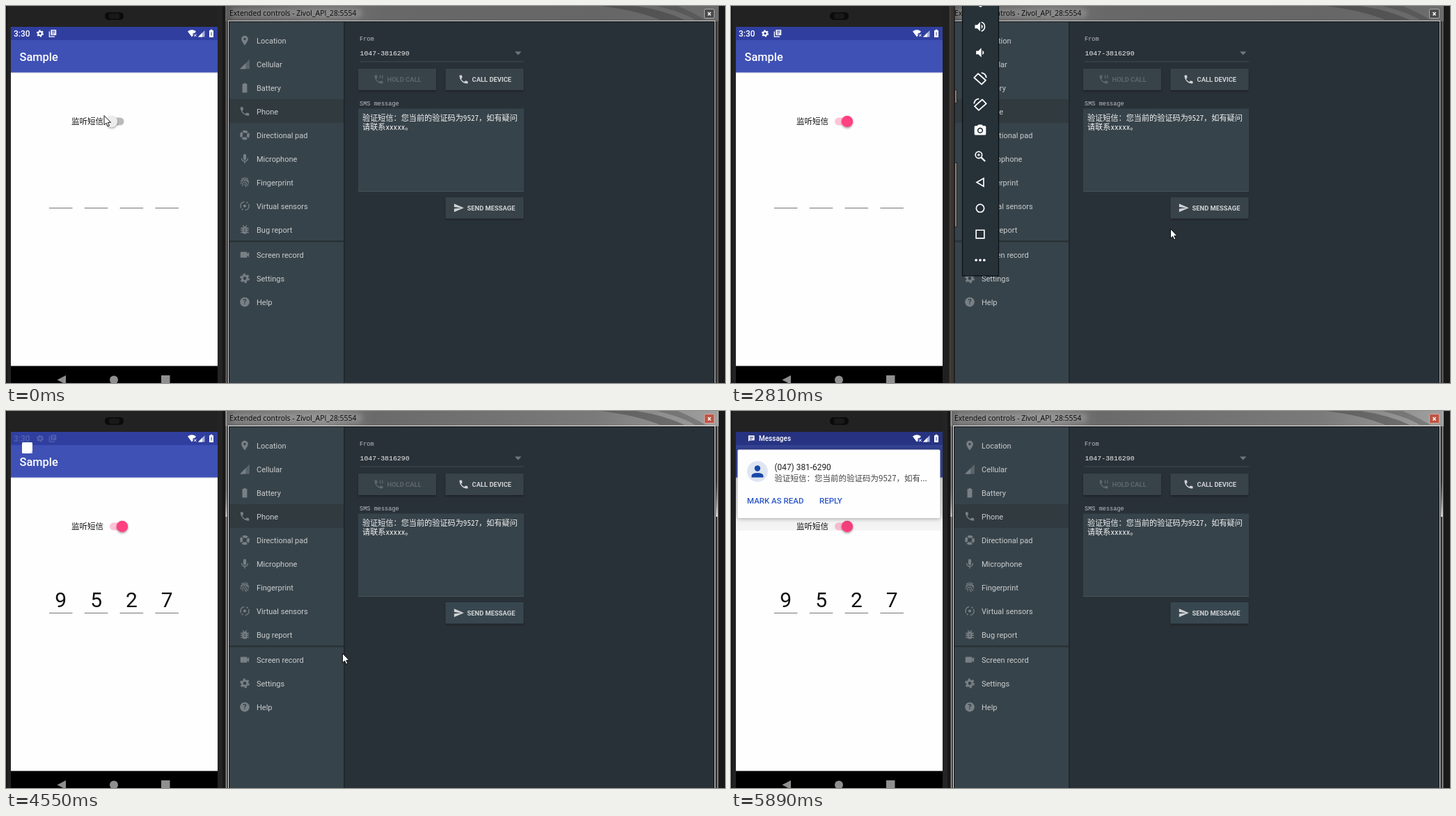
Recreate the animation shown at these times as an HTML page. Size 1033 by 542 pixels, loop 6.29 s.

```html
<!DOCTYPE html>
<html lang="en">
<head>
<meta charset="utf-8">
<title>SMS code autofill</title>
<style>
html, body { margin: 0; width: 100%; height: 100%; overflow: hidden; background: #1b1b1b; }
svg { display: block; width: 100%; height: 100%; }
text { font-family: Roboto, "Noto Sans CJK SC", sans-serif; white-space: pre; }
.cjk { font-family: "Noto Sans CJK SC", "Noto Sans CJK", sans-serif; }
.cjkMono { font-family: "Noto Sans Mono CJK SC", "Noto Sans CJK SC", monospace; }
.mono { font-family: "Liberation Mono", monospace; }
.open { font-family: "Open Sans", "Noto Sans", sans-serif; }
</style>
</head>
<body>
<svg id="stage" viewBox="0 0 1033 542" preserveAspectRatio="none"></svg>
<script>
const LOOP = 6290;

// Markup helpers
const rect = (x, y, w, h, fill, more = '') =>
  `<rect x="${x}" y="${y}" width="${w}" height="${h}" fill="${fill}" ${more}/>`;
const circle = (x, y, r, fill, more = '') =>
  `<circle cx="${x}" cy="${y}" r="${r}" fill="${fill}" ${more}/>`;
const text = (x, y, size, fill, str, more = '') =>
  `<text x="${x}" y="${y}" font-size="${size}" fill="${fill}" ${more}>${str}</text>`;
const path = (d, more = '') => `<path d="${d}" ${more}/>`;
const line = (d, width = 2, more = '') =>
  path(d, `fill="none" stroke="currentColor" stroke-width="${width}" ${more}`);
const group = (id, body, more = '') => `<g id="${id}" ${more}>${body}</g>`;
const gradient = (id, dir, stops) =>
  `<linearGradient id="${id}" ${dir}>` + stops.map(([at, color, alpha = 1]) =>
    `<stop offset="${at}" stop-color="${color}" stop-opacity="${alpha}"/>`).join('') + '</linearGradient>';

// Icons on a 24-unit grid
const ring = (r, w, more = '') => circle(12, 12, r, 'none', `stroke="currentColor" stroke-width="${w}" ${more}`);
const speaker = path('M3 9v6h4l5 5V4L7 9z');
const gear = ring(5.5, 4) + ring(8.6, 3, 'stroke-dasharray="4.5 4.5"');
const handset = path('M6.6 10.8c1.4 2.8 3.8 5.1 6.6 6.6l2.2-2.2c.3-.3.7-.4 1-.2 1.1.4 2.3.6 3.6.6.6 0 1 .4 1 1V20c0 .6-.4 1-1 1C10.6 21 3 13.4 3 4c0-.6.4-1 1-1h3.5c.6 0 1 .4 1 1 0 1.2.2 2.4.6 3.6.1.3 0 .7-.2 1z');
const tilt = line('M1.5 10.5l7-7 13 11.5-7 7z', 2.2, 'stroke-linejoin="round"') + line('M14 2.2q7.5.8 8.6 8.3', 2.2);
const icons = {
  pin: path('M12 2C8 2 5 5 5 9c0 5 7 13 7 13s7-8 7-13c0-4-3-7-7-7zm0 9.5a2.5 2.5 0 0 1 0-5 2.5 2.5 0 0 1 0 5z'),
  cell: path('M2 22H22V2z', 'opacity=".55"') + path('M2 22H14V10z'),
  battery: path('M14 4V2h-4v2H7v18h10V4z'),
  handset,
  hold: handset + line('M15 3v7M20 3v7'),
  pad: ring(7.3, 5.4, 'stroke-dasharray="9.5 1.97" stroke-dashoffset="4.7"'),
  mic: rect(9, 2, 6, 13, 'currentColor', 'rx="3"') + line('M5.5 11a6.5 6.5 0 0 0 13 0M12 17.5V22'),
  print: line('M5 5q7-5 14 0M3 10q9-9 18 0M4 16c0-11 16-11 16-1M8 20c-3-11 8-11 8-4q1 3 4 2M12 14q0 5 4 7', 1.6),
  sensor: circle(12, 12, 3, 'currentColor') + line('M11 3a9 9 0 0 0-7 13M13 21a9 9 0 0 0 7-13') +
    circle(17, 5, 1.6, 'currentColor') + circle(7, 19, 1.6, 'currentColor'),
  bug: rect(7, 6, 10, 15, 'currentColor', 'rx="5"') + line('M3.5 9H20.5M3.5 13.5H20.5M3.5 18H20.5M8 3l3 4M16 3l-3 4') +
    path('M10 10h4v2h-4zm0 4h4v2h-4z', 'fill="#37434a"'),
  video: path('M17 10.5V7q0-1-1-1H4Q3 6 3 7v10q0 1 1 1h12q1 0 1-1v-3.5l4 4v-11z'),
  gear,
  help: circle(12, 12, 10, 'currentColor') + text(12, 17.6, 16, '#37434a', '?', 'text-anchor="middle" font-weight="700"'),
  send: path('M2 21l21-9L2 3v7l15 2-15 2z'),
  loud: speaker + path('M14 8q5 4 0 8z') + line('M14 4.3a8 8 0 0 1 0 15.4'),
  quiet: `<g transform="translate(2)">${speaker}${path('M14 8q5 4 0 8z')}</g>`,
  left: tilt,
  right: `<g transform="matrix(-1 0 0 1 24 0)">${tilt}</g>`,
  camera: path('M9 2L7 4H4Q2 4 2 6v12q0 2 2 2h16q2 0 2-2V6q0-2-2-2h-3l-2-2zM12 7a5 5 0 0 1 0 10 5 5 0 0 1 0-10z', 'fill-rule="evenodd"') + circle(12, 12, 3, 'currentColor'),
  zoom: circle(9.5, 9.5, 5.7, 'none', 'stroke="currentColor" stroke-width="2"') + line('M14 14l6.5 6.5', 2.6) + line('M7 9.5h5M9.5 7v5', 1.3),
  back: line('M18 5v14L6 12z'),
  home: ring(6.8, 2),
  recent: line('M5 5h14v14H5z'),
  dots: [5, 12, 19].map(x => circle(x, 12, 2.2, 'currentColor')).join(''),
  news: line('M3 6v15h15', 2.4) + path('M7 2h15v15H7zm3 3v2h9V5zm0 4v2h9V9zm0 4v1.6h6V13z', 'fill-rule="evenodd"'),
  chat: path('M2 2h20v16H6l-4 4zm4 4v2h12V6zm0 3.5v2h12v-2zm0 3.5v2h9v-2z', 'fill-rule="evenodd"')
};
const icon = (name, cx, cy, size, color) =>
  `<g transform="translate(${cx - size / 2} ${cy - size / 2}) scale(${size / 24})" fill="currentColor" color="${color}">${icons[name]}</g>`;

const defs = '<defs>' +
  gradient('idleBar', '', [[0, '#5a5a5a'], [.2, '#747474'], [.32, '#686868'], [.75, '#666'], [1, '#6c6c6c']]) +
  gradient('liveBar', '', [[0, '#6a6a6a'], [.2, '#858585'], [.3, '#6a6a6a'], [.75, '#7a7a7a'], [1, '#a0a0a0']]) +
  gradient('scrimFill', 'x2="0" y2="1"', [[0, '#000', .2], [1, '#000', .035]]) +
  gradient('edge', '', [[0, '#181818'], [.35, '#4a4441'], [.6, '#35302e'], [1, '#4a4340']]) +
  gradient('glint', 'x2="0" y2="1"', [[0, '#999', 0], [1, '#e6e6e6']]) +
  '<filter id="soft" x="-10%" y="-20%" width="120%" height="150%"><feDropShadow dx="0" dy="1.5" stdDeviation="1.5" flood-opacity=".4"/></filter>' +
  '<filter id="blur" x="-20%" y="-50%" width="140%" height="200%"><feGaussianBlur stdDeviation="3"/></filter></defs>';

function button(x, y, w, h, label, name, labelX, color, id = '') {
  return rect(x, y, w, h, '#37434a', `id="${id}" rx="1" filter="url(#soft)"`) +
    icon(name, labelX - 12, y + h / 2, 16, color) +
    text(labelX, y + h / 2 + 3.4, 9.4, color, label, 'font-weight="700"');
}

function controls() {
  const rows = [['pin', 'Location'], ['cell', 'Cellular'], ['battery', 'Battery'], ['handset', 'Phone'],
    ['pad', 'Directional pad'], ['mic', 'Microphone'], ['print', 'Fingerprint'], ['sensor', 'Virtual sensors'],
    ['bug', 'Bug report'], ['video', 'Screen record'], ['gear', 'Settings'], ['help', 'Help']];
  const menu = rows.map(([name, label], i) => {
    const y = 49.5 + 34 * i + (i > 8 ? 2 : 0);
    return icon(name, 343, y, 16.5, '#788085') + text(360, y + 4.2, 11, '#c9cdcf', label);
  }).join('');
  const close = (fill, edge) => rect(1003.5, 4.5, 14, 13, fill, `rx="1.5" stroke="${edge}"`) +
    path('M1008.5 9l4 4.5m0-4.5l-4 4.5', 'stroke="#fff" stroke-width="1.5"');
  const frame = (fill, outer, inner) => rect(315, 0, 709, 542, '#3a3a3a') + rect(315, 0, 709, 22, fill) +
    path('M855 0q50 6 85 20h35q-30-14-70-20z', 'fill="#333" opacity=".4"') +
    path('M935 0q35 8 55 20h15q-20-12-40-20z', 'fill="#333" opacity=".3"') +
    rect(316.5, -2, 706, 560, 'none', `stroke="${outer}"`) +
    rect(319.5, 21.5, 699, 540, '#111', `stroke="${inner}"`);
  return rect(313, 0, 720, 542, '#191919') +
    group('idleWin', frame('url(#idleBar)', '#6f6a68', '#cfcfcf') + close('#4b4b4b', '#a9a9a9')) +
    group('liveWin', frame('url(#liveBar)', '#a8a8a8', '#ececec') + close('#bd5544', '#d9a79e') +
      rect(315.5, 110, 2, 42, 'url(#glint)') + rect(1020, 100, 2.5, 52, 'url(#glint)')) +
    rect(322, 3, 190, 14, '#b5b5b5', 'opacity=".35" rx="7" filter="url(#blur)"') +
    text(321, 13.6, 10.4, '#080808', 'Extended controls - Zivol_API_28:5554', 'class="open"') +
    rect(321, 23, 696, 519, '#293138') + rect(321, 23, 164, 519, '#37434a') +
    rect(321, 134, 164, 34, '#303a3f') + rect(321, 337, 164, 2.5, '#293237') +
    rect(485, 23, 2, 519, '#20282d') + menu +
    text(508, 50, 8.6, '#b9bdc0', 'From', 'class="mono"') +
    text(508.5, 71, 9.9, '#f3f4f4', '1047-3816290', 'class="mono"') +
    rect(508, 79.5, 236, 1, '#414c52') + path('M731 65.5h9.5l-4.75 5z', 'fill="#6f787d"') +
    button(506, 90, 112, 31, 'HOLD CALL', 'hold', 547.5, '#5d676c') +
    button(631.5, 90, 112, 31, 'CALL DEVICE', 'handset', 669.5, '#d0d3d5') +
    text(508, 143, 8.6, '#b9bdc0', 'SMS message', 'class="mono"') +
    rect(506, 147.5, 238, 119.5, '#37434a') + rect(506, 266, 238, 1, '#465158') +
    text(512, 164.5, 11.15, '#f3f4f4', '验证短信：您当前的验证码为9527，如有疑问', 'class="cjkMono"') +
    text(512, 177.5, 11.15, '#f3f4f4', '请联系xxxxx。', 'class="cjkMono"') +
    button(631.5, 275, 112, 30.5, 'SEND MESSAGE', 'send', 662.5, '#d0d3d5', 'sendButton');
}

function phone() {
  const slots = [...'9527'].map((d, i) => ({ d, x: 62 + 50.8 * i }));
  const card = rect(10, 56, 290.5, 98, '#000', 'opacity=".4" filter="url(#blur)"') +
    rect(9.5, 55.5, 291, 98.5, '#fefefe', 'rx="2"') + circle(38, 87, 15, '#dfe5f1') +
    circle(38, 82.5, 4.2, '#1749a8') + path('M29.5 95.5v-2q0-4.5 8.5-4.5t8.5 4.5v2z', 'fill="#1749a8"') +
    text(62.5, 84.5, 11.9, '#202020', '(047) 381-6290') +
    text(62.5, 101, 11.5, '#454545', '验证短信：您当前的验证码为9527，如有...', 'class="cjk"') +
    text(23, 133, 11.5, '#2a56c6', 'MARK AS READ', 'font-weight="500"') +
    text(127, 133, 11.5, '#2a56c6', 'REPLY', 'font-weight="500"');
  return rect(0, 0, 314, 542, '#222') + rect(0, 0, 1.5, 542, '#111') + rect(304, 0, 10, 542, '#242424') +
    rect(311, 0, 3, 542, '#181818') +
    rect(142, 9, 27, 11, '#0b0b0b', 'rx="5"') + rect(148, 10.5, 15, 8, '#191919', 'rx="3"') +
    rect(7, 30, 297, 488, '#fefefe') + rect(7, 30, 297, 19, '#303f9f') + rect(7, 49, 297, 46, '#3f51b5') +
    rect(7, 95, 297, 1, '#8f98cf') + rect(7, 96, 297, 1, '#e6e7ee') +
    text(19.5, 79, 16.4, '#fff', 'Sample', 'font-weight="500"') +
    text(94, 170.4, 11.5, '#111', '监听短信', 'class="cjk"') +
    rect(149, 160.5, 20.5, 11, '#bababa', 'id="track" rx="5.5"') +
    circle(152, 166, 16.3, '#000', 'id="ripple" opacity=".09"') +
    circle(152, 166, 8.2, '#ececec', 'id="thumb" filter="url(#soft)"') +
    slots.map(s => rect(s.x, 290, 33.5, 1, '#757575')).join('') +
    group('digits', slots.map(s => text(s.x + 16.8, 282, 30, '#111', s.d, 'text-anchor="middle"')).join('')) +
    rect(7, 30, 297, 142, 'url(#scrimFill)', 'id="scrim"') +
    group('clock', text(11, 44, 11.9, '#fff', '3:30', 'font-weight="500"') +
      icon('gear', 49, 39.5, 12, '#fff') + icon('news', 67, 39.5, 12.5, '#fff')) +
    group('ticker', icon('chat', 29.3, 39.5, 10.5, '#fff') +
      text(40, 43.4, 10, '#fff', 'Messages', 'font-weight="500"')) +
    path('M261 36.5q6-4.5 12 0l-6 8z', 'fill="#fff"') + path('M269 39.5l5 5m0-5l-5 5', 'stroke="#303f9f" stroke-width="3"') +
    path('M270 40.5l3.5 3.5m0-3.5l-3.5 3.5', 'stroke="#fff"') +
    path('M276 44.5h9.5V35z', 'fill="#aab0da"') + path('M276 44.5h6V38.5z', 'fill="#fff"') +
    path('M292 35h1.7v-1.2h2.6V35h1.7v10h-6z', 'fill="#fff"') + rect(294.5, 37.5, 1, 5, '#303f9f') +
    group('chip', rect(23, 45, 15, 16, '#fefefe', 'rx="1.5"') + path('M34 61l4-4v4z', 'fill="#c9cfed"')) +
    group('card', card) +
    rect(7, 517.5, 297, 25, '#000') + path('M86 531v13l-12.5-6.5z', 'fill="#8f8f8f"') +
    circle(155, 537.5, 6, '#8f8f8f') + rect(223, 531, 12.5, 12, '#8f8f8f');
}

function toolbar() {
  const names = ['loud', 'quiet', 'left', 'right', 'camera', 'zoom', 'back', 'home', 'recent', 'dots'];
  const sideKey = (y, h) => rect(321, y, 4, h, '#2a2624') + rect(322, y + 1, 2, h - 2, '#857b76');
  return rect(312, 0, 9, 542, 'url(#edge)') + rect(304, 0, 8, 542, '#202020') + rect(320, 0, 1.5, 542, '#151515') +
    sideKey(120, 20) + sideKey(225, 93) +
    rect(332.5, -2, 52, 390, '#263138', 'stroke="#0b0f11" stroke-width="1.2"') + circle(358.5, -1, 2.5, '#fff') +
    names.map((name, i) => icon(name, 358, 29.7 + 37.3 * i, 20, '#fff')).join('');
}

const stage = document.getElementById('stage');
stage.innerHTML = defs + controls() + phone() + group('toolbar', toolbar()) +
  group('cursor', path('M.5.5V14L3.6 11.2 5.7 16l2.2-1-2.1-4.6H10z', 'fill="#fff" stroke="#000" stroke-width=".9"'));

const el = id => document.getElementById(id);
const show = (id, on) => el(id).setAttribute('display', on ? 'inline' : 'none');
const set = (id, attrs) => { for (const k in attrs) el(id).setAttribute(k, attrs[k]); };
const pick = (keys, t) => keys.filter(k => k[0] <= t).pop();

// [time, x, y]
const pointer = [[0, 140.5, 157], [280, 144.5, 157], [430, 149.5, 158], [2000, 150.5, 171],
  [2150, 158, 181], [2270, 181, 204], [2390, 222, 239], [2510, 265, 275], [2660, 607, 317], [2810, 631, 320],
  [3340, 662, 304], [3460, 677, 291], [4400, 621, 317], [4550, 483, 348], [4670, 470, 348], [4790, 465.5, 348],
  [5620, 664, 408], [5770, 904, 508]];
// [time, thumb x, thumb colour, track colour, ripple]
const toggle = [[0, 152, '#ececec', '#bababa', 0], [830, 152, '#ececec', '#bababa', 1],
  [950, 156, '#f0c3d0', '#ccb8bf', 1], [1100, 167, '#ff4081', '#ffc3d6', 0]];
// [time, vertical offset]
const drop = [[0, 0], [4670, 7], [4790, 3], [4910, 1], [5030, 0]];

function draw(t) {
  const [, px, py] = pick(pointer, t);
  set('cursor', { transform: `translate(${px} ${py})` });
  show('cursor', t < 5890);

  const [, cx, thumb, track, ripple] = pick(toggle, t);
  set('thumb', { cx, fill: thumb });
  set('track', { fill: track });
  set('ripple', { cx });
  show('ripple', ripple);

  const live = t >= 3610;
  show('toolbar', t >= 680 && !live);
  show('idleWin', !live);
  show('liveWin', live);
  set('sendButton', { fill: t >= 3730 && t < 3850 ? '#262829' : t >= 3850 ? '#37474f' : '#37434a' });

  const alert = t >= 4670;
  show('digits', t >= 4400);
  show('chip', t >= 4550 && !alert);
  set('clock', { opacity: t < 4550 ? 1 : .17 });
  show('clock', !alert);
  for (const id of ['scrim', 'ticker', 'card']) show(id, alert);
  set('card', { transform: `translate(0 ${pick(drop, t)[1]})` });
}

const start = performance.now();
function tick() {
  draw((performance.now() - start) % LOOP);
  requestAnimationFrame(tick);
}
tick();
</script>
</body>
</html>
```
